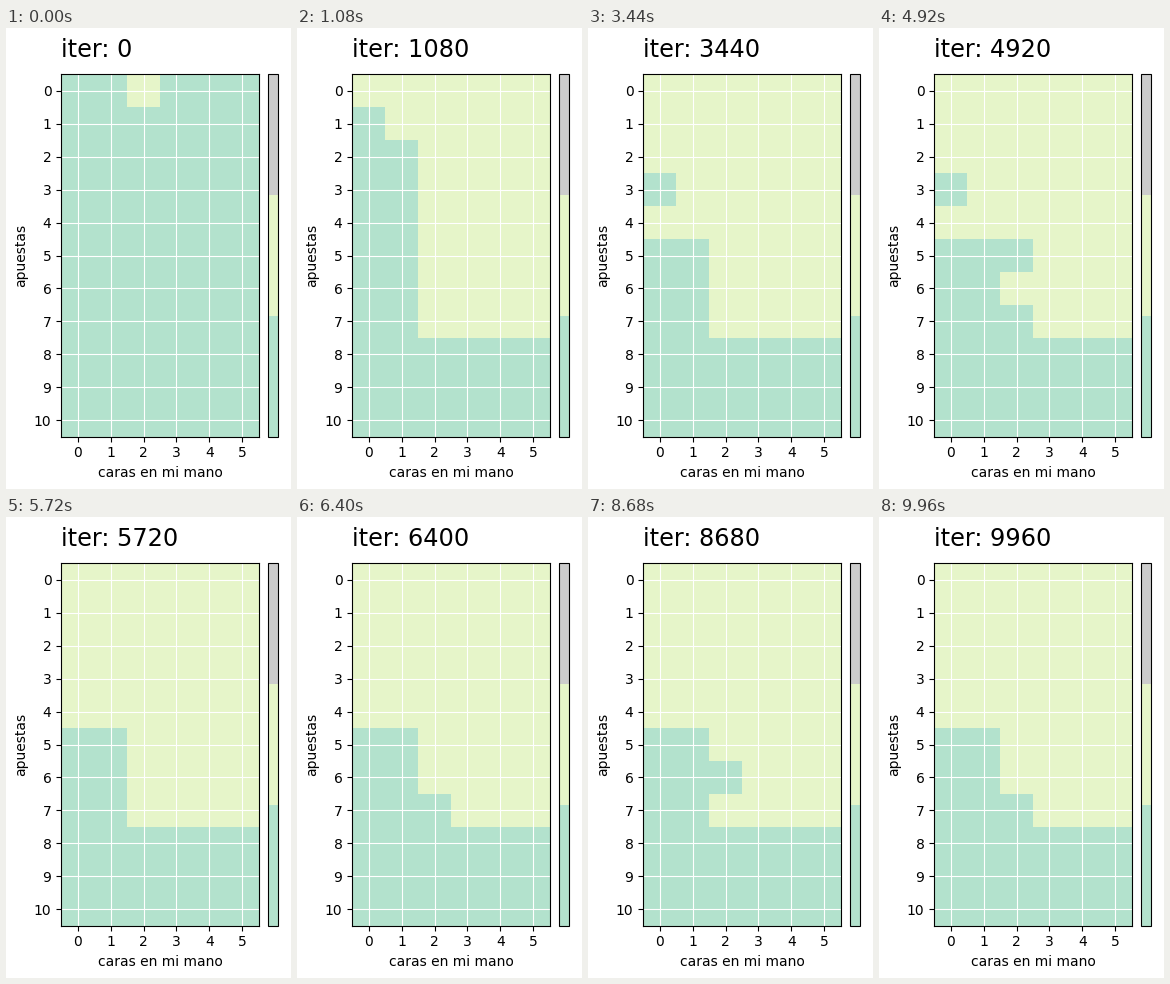
These frames come from a looping animation (285 px wide and 461 px high, 10000 ms). A matplotlib script:

```python
import matplotlib.pyplot as plt
import numpy as np
from matplotlib.animation import FuncAnimation
from matplotlib.colors import ListedColormap

W, H, DPI = 285, 461, 100
STEP, FRAMES = 40, 250
ROWS, COLS = 11, 6
LEFT, TOP, HEIGHT = 55.16, 46.33, 362.4
WIDTH = HEIGHT * COLS / ROWS

plt.rcParams["font.family"] = "DejaVu Sans"
plt.rcParams["font.size"] = 10


def px_axes(fig, x, y, w, h):
    """Add axes placed in pixels, measured from the top left."""
    return fig.add_axes([x / W, 1 - (y + h) / H, w / W, h / H])


def settle_times():
    """Time (ms) at which each cell first turns to raising."""
    row, col = np.mgrid[:ROWS, :COLS]
    good = 120 * row + 40 * (col - 2)
    weak = 200 + 700 * row
    times = np.where(col >= 2, good, weak).astype(float)
    times[:5, 0] = 400, 1200, 2640, 5640, 1400
    times[5:, :2] = np.inf
    times[8:] = np.inf
    return times


SETTLE = settle_times()


def policy(now):
    grid = (SETTLE <= now).astype(float)
    # close calls with two heads: one keeps swinging, two slip back briefly
    if now > 1080:
        grid[7, 2] = (now - 2580) % 2620 < 1120
    if 4680 <= now < 5120:
        grid[5, 2] = 0
    if 8440 <= now < 9240:
        grid[6, 2] = 0
    return grid


fig = plt.figure(figsize=(W / DPI, H / DPI), dpi=DPI, facecolor="white")
ax = px_axes(fig, LEFT, TOP, WIDTH, HEIGHT)
cmap = ListedColormap(["#b3e2cd", "#e6f5c9", "#cccccc"])
image = ax.imshow(policy(0), cmap=cmap, vmin=0, vmax=2,
                  aspect="auto", interpolation="nearest")
ax.set_xticks(range(COLS))
ax.set_yticks(range(ROWS))
ax.grid(color="white", linewidth=0.8)
ax.set_xlabel("caras en mi mano")
ax.set_ylabel("apuestas")

bar_ax = px_axes(fig, 262.4, TOP, WIDTH / 20, HEIGHT)
fig.colorbar(image, cax=bar_ax, ticks=[])

title = fig.text(LEFT / W, 1 - 29 / H, "", fontsize="xx-large",
                 va="baseline")


def update(frame):
    now = frame * STEP
    image.set_data(policy(now))
    title.set_text(f"iter: {now}")
    return image, title


anim = FuncAnimation(fig, update, frames=FRAMES, interval=STEP,
                     repeat=True, repeat_delay=0, blit=False)
plt.show()
```
